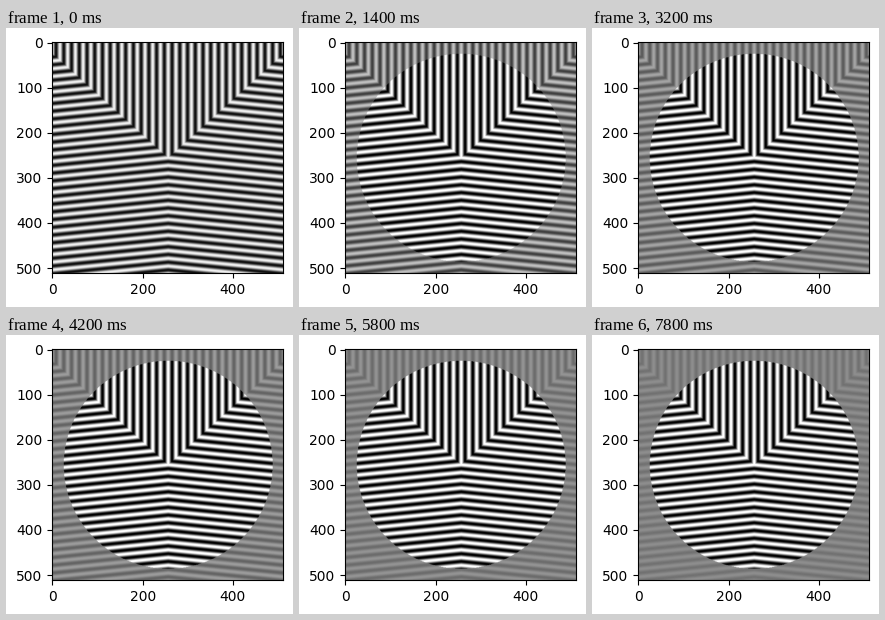
A matplotlib script for the animation above (8000 ms loop, 287 by 279 pixels).

```python
import numpy as np
import matplotlib.pyplot as plt
from matplotlib.animation import FuncAnimation

W, H, DPI = 287, 279, 100
SIZE = 512
FRAMES, STEP = 40, 200
PERIOD = SIZE / 30      # stripe spacing in data units
TILT = np.arctan(0.1)   # slope of the lower stripes
RADIUS = 0.45 * SIZE
LEFT, TOP, SIDE = 46.2, 14.3, 231

plt.rcParams["font.family"] = "DejaVu Sans"


def stripes(x, y):
    """Three sectors of parallel stripes, joined without a phase jump."""
    u = np.abs(x)
    seam = (np.pi / 2 - TILT) / 2
    lower = u * np.sin(TILT) + y * np.cos(TILT)
    dist = np.where(np.arctan2(y, u) > seam, u, lower)
    return np.cos(2 * np.pi * dist / PERIOD)


row, col = np.mgrid[0:SIZE, 0:SIZE]
x, y = col - SIZE / 2, SIZE / 2 - row
wave = stripes(x, y)
inside = np.hypot(x, y) < RADIUS


def field(n):
    inner = 1.08 - 0.16 * np.exp(-n / 3)
    outer = 0.92 / (1 + 0.045 * n) ** 2.1
    return wave * np.where(inside, inner, outer)


fig = plt.figure(figsize=(W / DPI, H / DPI), dpi=DPI, facecolor="white")
ax = fig.add_axes([LEFT / W, 1 - (TOP + SIDE) / H, SIDE / W, SIDE / H])
image = ax.imshow(field(0), cmap="gray", vmin=-1, vmax=1)


def draw(n):
    image.set_data(field(n))
    return [image]


anim = FuncAnimation(fig, draw, frames=FRAMES, interval=STEP,
                     repeat=True, repeat_delay=0)
plt.show()
```
